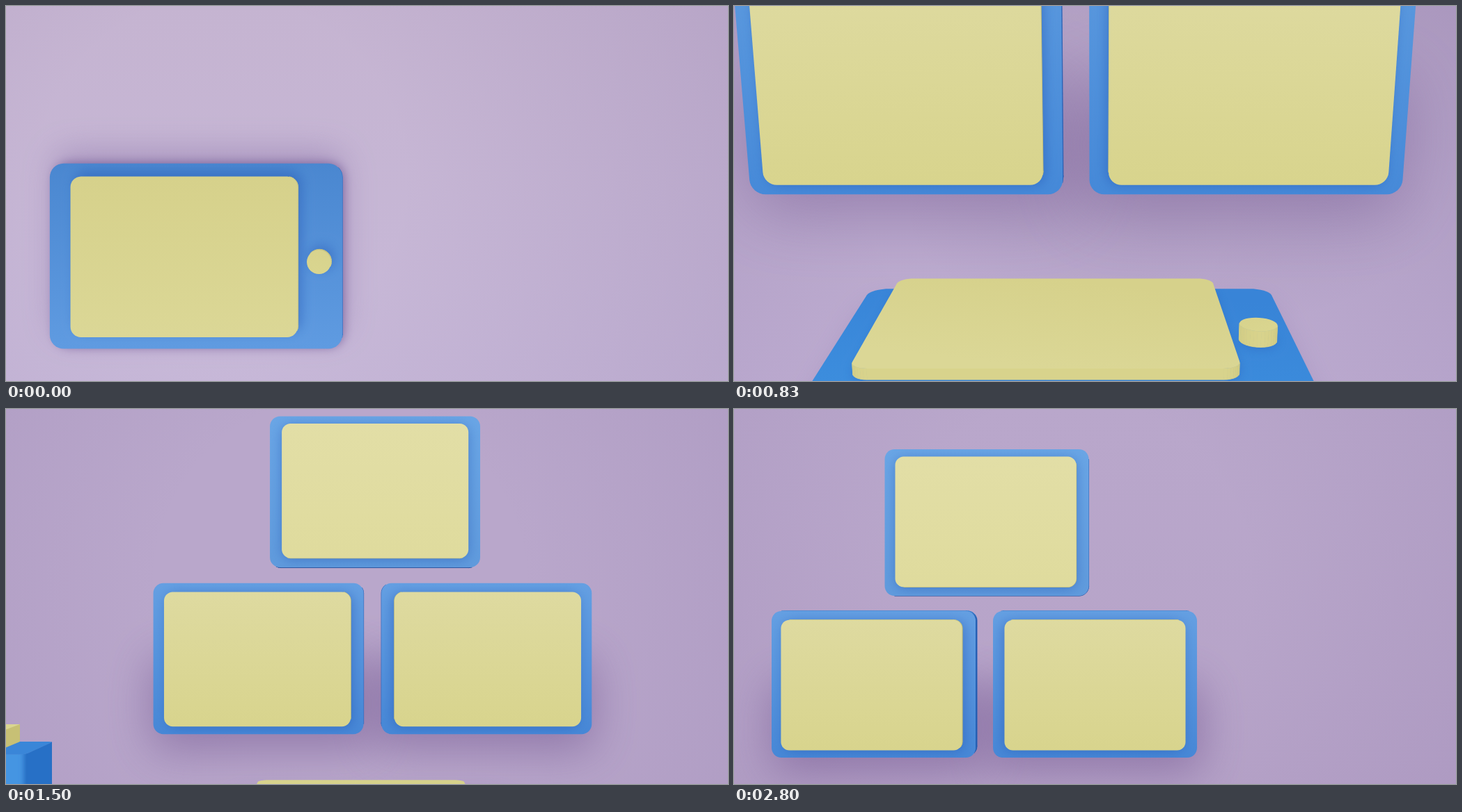
An HTML page with a canvas for the animation above (2970 ms loop, 1037 by 540 pixels).

```html
<!DOCTYPE html>
<html lang="en">
<head>
<meta charset="utf-8">
<title>Floating screens</title>
<style>
  html, body { margin: 0; width: 100%; height: 100%; overflow: hidden; background: #bba9cd; }
  canvas { display: block; width: 100%; height: 100%; }
</style>
</head>
<body>
<canvas id="stage" width="1037" height="540"></canvas>
<script>
const ctx = document.getElementById('stage').getContext('2d');
const W = 1037, H = 540, LOOP = 2970, FOCAL = 1480;

// Times at which the picture advances
const TICKS = [0, 300, 330, 430, 530, 630, 730, 830, 930, 1030, 1100, 1130, 1200, 1230, 1330,
  1400, 1500, 1600, 1700, 2100, 2200, 2300, 2400, 2500, 2600, 2700, 2800];

// Camera path: time, x, y, z, downward pitch in degrees
const PATH = [
  [0, 191.3, 802, 138, 90],
  [260, 191.3, 802, 138, 90],
  [430, 157.2, 629.3, 266.8, 76],
  [830, 14.2, -102.5, 938, 14.07],
  [1230, -17, -240, 1359, 0],
  [1500, -11.2, -146.2, 1436, 0],
  [1700, -10, -116, 1443, 0],
  [2050, -10, -116, 1443, 0],
  [2100, -2.4, -115.5, 1445, 0],
  [2600, 130.4, -107.3, 1468, 0],
  [2800, 155.5, -106.5, 1480, 0],
  [2970, 155.5, -106.5, 1480, 0]
];

// Backdrop: time, top colour, bottom colour
const SKY = [
  [0, '#c5b4d1', '#c7b8d8'],
  [300, '#c5b4d1', '#c7b8d8'],
  [430, '#b9a6ca', '#bfaed1'],
  [830, '#b2a0c4', '#bfaed2'],
  [1230, '#b8a6cb', '#c3b4d8'],
  [1500, '#b9a7cb', '#b9a7cb'],
  [2970, '#b9a7cb', '#b6a3c8']
];

const BLUE = { front: '#3c8cdc', rear: '#26559f', right: '#2f78cc', left: '#2f78cc' };
const BLUE_BOX = { ...BLUE, front: '#4595e2', right: '#2770c6' };
const BLUE_WALL = { front: '#26559f', rear: '#3f87d4', right: '#2560b4', left: '#2d6cc0' };
const YELLOW = { front: '#d8d38c', rear: '#c9c37c', right: '#d0ca82', left: '#d3cd85' };
const YELLOW_BOX = { ...YELLOW, right: '#c7c075' };
const YELLOW_WALL = { front: '#c2bb78', rear: '#cdc77d', right: '#c6bf74', left: '#c9c27a' };

const rgb = hex => [1, 3, 5].map(i => parseInt(hex.slice(i, i + 2), 16));
function mix(a, b, k) {
  const p = rgb(a), q = rgb(b);
  return '#' + p.map((v, i) => Math.round(v + (q[i] - v) * k).toString(16).padStart(2, '0')).join('');
}

function segment(keys, t) {
  let i = 0;
  while (i < keys.length - 2 && t >= keys[i + 1][0]) i++;
  return [i, (t - keys[i][0]) / (keys[i + 1][0] - keys[i][0])];
}

// Monotone cubic through the keys, so that the camera never overshoots
function smooth(keys, t, col) {
  const [i, u] = segment(keys, t);
  const slope = j => j < 0 || j > keys.length - 2 ? 0
    : (keys[j + 1][col] - keys[j][col]) / (keys[j + 1][0] - keys[j][0]);
  const tangent = j => {
    const a = slope(j - 1), b = slope(j);
    return a * b > 0 ? 2 * a * b / (a + b) : 0;
  };
  const span = keys[i + 1][0] - keys[i][0], v = 1 - u;
  return keys[i][col] * v * v * (1 + 2 * u) + keys[i + 1][col] * u * u * (3 - 2 * u)
    + span * u * v * (tangent(i) * v - tangent(i + 1) * u);
}

const cam = {};
function aim(t) {
  ['x', 'y', 'z'].forEach((name, i) => cam[name] = smooth(PATH, t, i + 1));
  const pitch = smooth(PATH, t, 4);
  cam.sin = Math.sin(pitch * Math.PI / 180);
  cam.cos = Math.cos(pitch * Math.PI / 180);
  cam.tilt = pitch / 90;
}

function project([x, y, z]) {
  const dy = y - cam.y, dz = z - cam.z;
  const scale = FOCAL / (-cam.sin * dy - cam.cos * dz);
  return [W / 2 + (x - cam.x) * scale, H / 2 - (cam.cos * dy - cam.sin * dz) * scale, scale];
}

// Rounded rectangle as a ring of points
function outline(w, h, r) {
  const points = [], steps = 8;
  for (let q = 0; q < 4; q++) {
    const sx = q === 0 || q === 3 ? 1 : -1, sy = q < 2 ? 1 : -1;
    for (let i = 0; i <= steps; i++) {
      const a = (q + i / steps) * Math.PI / 2;
      points.push([sx * (w / 2 - r) + r * Math.cos(a), sy * (h / 2 - r) + r * Math.sin(a)]);
    }
  }
  return points;
}

// Slabs either face the viewer or lie flat on the floor
const place = (s, u, v, d) => s.flat ? [s.x + u, s.y - d, s.z - v] : [s.x + u, s.y + v, s.z - d];
const rim = (s, d = 0) => outline(s.w, s.h, s.r).map(([u, v]) => project(place(s, u, v, d)));

function trace(points, dx = 0, dy = 0) {
  ctx.beginPath();
  points.forEach(p => ctx.lineTo(p[0] + dx, p[1] + dy));
  ctx.closePath();
}

function softShape(points, color, blur, dx = 0, dy = 0) {
  const away = 6000;
  ctx.save();
  ctx.shadowColor = color;
  ctx.shadowBlur = blur;
  ctx.shadowOffsetX = away;
  ctx.fillStyle = '#000';
  trace(points, dx - away, dy);
  ctx.fill();
  ctx.restore();
}

function drawSlab(s) {
  const edge = outline(s.w, s.h, s.r), top = rim(s), base = rim(s, s.t);
  edge.forEach(([u, v], i) => {
    const j = (i + 1) % edge.length;
    let nu = edge[j][1] - v, nv = u - edge[j][0];
    const len = Math.hypot(nu, nv);
    if (len < 1e-6) return;
    nu /= len; nv /= len;
    const p = place(s, u, v, 0);
    const facing = nu * (cam.x - p[0]) + nv * (s.flat ? p[2] - cam.z : cam.y - p[1]);
    if (facing <= 0) return;
    const color = mix(nv < 0 ? s.side.front : s.side.rear, nu > 0 ? s.side.right : s.side.left, nu * nu);
    ctx.fillStyle = ctx.strokeStyle = color;
    ctx.lineWidth = 0.8;
    trace([top[i], top[j], base[j], base[i]]);
    ctx.fill();
    ctx.stroke();
  });
  const a = project(place(s, 0, s.h / 2, 0)), b = project(place(s, 0, -s.h / 2, 0));
  const shade = ctx.createLinearGradient(a[0], a[1], b[0], b[1]);
  shade.addColorStop(0, s.cap[0]);
  shade.addColorStop(1, s.cap[1]);
  ctx.fillStyle = shade;
  trace(top);
  ctx.fill();
}

function castOn(ground, item, dx, dy) {
  ctx.save();
  trace(rim(ground));
  ctx.clip();
  softShape(rim(item, item.t), 'rgba(35,85,180,.5)', 17, dx, dy);
  ctx.restore();
}

function drawMonitor(x, y, blue, yellow, lean) {
  const k = cam.tilt;
  const body = { x, y, z: 0, w: 293, h: 211, r: 14, t: 18, side: BLUE_WALL,
    cap: [mix(blue[0], '#2c76cb', k), mix(blue[1], '#3f93e2', k)] };
  const face = { x, y, z: 14, w: 257.6, h: 186, r: 12, t: 5, side: YELLOW_WALL, cap: yellow };
  drawSlab(body);
  castOn(body, face, lean, 2);
  drawSlab(face);
}

function drawTablet() {
  const k = cam.tilt ** 2;
  const body = { flat: true, x: -7.5, y: -396, z: 211, w: 340, h: 216, r: 16, t: 10, side: BLUE,
    cap: [mix('#3884d7', '#4a87d0', k), mix('#3b8ddd', '#5f9be1', k)] };
  const face = { flat: true, x: -18.8, y: -381.5, z: 211, w: 261, h: 185, r: 12, t: 8, side: YELLOW,
    cap: ['#d6d18b', '#dbd796'] };
  const knob = { flat: true, x: 136, y: -384, z: 217, w: 28, h: 28, r: 14, t: 12.5, side: YELLOW,
    cap: ['#d8d38d', '#d9d58f'] };
  const under = { ...body, y: -417 };
  softShape(rim({ ...under, z: 203 }), 'rgba(110,82,148,.35)', 48, 0, -8 * k);
  softShape(rim(under), 'rgba(98,70,135,.75)', 16);
  drawSlab(body);
  castOn(body, face, 4 * k, -7 * k);
  castOn(body, knob, 3 * k, -5 * k);
  drawSlab(face);
  drawSlab(knob);
}

function drawSideBox() {
  const body = { flat: true, x: -542, y: -318, z: 268.5, w: 320, h: 99, r: 7, t: 84,
    side: BLUE_BOX, cap: ['#3a86d8', '#3a8ad8'] };
  const lid = { flat: true, x: -547, y: -296, z: 268.5, w: 260, h: 75, r: 2, t: 20,
    side: YELLOW_BOX, cap: ['#dad690', '#dad690'] };
  drawSlab(body);
  drawSlab(lid);
}

function drawBackdrop(t) {
  const [i, u] = segment(SKY, t);
  const sky = ctx.createLinearGradient(0, 0, 0, H);
  sky.addColorStop(0, mix(SKY[i][1], SKY[i + 1][1], u));
  sky.addColorStop(1, mix(SKY[i][2], SKY[i + 1][2], u));
  ctx.fillStyle = sky;
  ctx.fillRect(0, 0, W, H);

  const cx = 480 - 170 * cam.tilt;
  const vignette = ctx.createRadialGradient(cx, 250, 260, cx, 250, 760);
  vignette.addColorStop(0, 'rgba(110,85,145,0)');
  vignette.addColorStop(1, 'rgba(110,85,145,.15)');
  ctx.fillStyle = vignette;
  ctx.fillRect(0, 0, W, H);
}

function drawWallShadows() {
  const alpha = 0.46 * (1 - 0.7 * cam.tilt);
  for (const x of [-162.5, 155.5]) {
    const patch = rim({ x, y: -300, z: -40, w: 316, h: 134, r: 14 });
    softShape(patch, `rgba(100,70,132,${alpha})`, 64 * patch[0][2]);
  }
  const [x, y, scale] = project([100, -405, -170]);
  ctx.save();
  ctx.translate(x, y);
  ctx.scale(scale * 300, scale * 130);
  const pool = ctx.createRadialGradient(0, 0, 0, 0, 0, 1);
  pool.addColorStop(0, `rgba(92,70,118,${0.55 * cam.tilt})`);
  pool.addColorStop(0.5, `rgba(92,70,118,${0.36 * cam.tilt})`);
  pool.addColorStop(1, 'rgba(92,70,118,0)');
  ctx.fillStyle = pool;
  ctx.fillRect(-1, -1, 2, 2);
  ctx.restore();
}

function draw(t) {
  aim(t);
  drawBackdrop(t);
  if (t >= 300) {
    drawWallShadows();
    const low = ['#649fe2', '#4687d6'], lowFace = ['#dedaa0', '#d8d48d'];
    drawMonitor(-162.5, -233, low, lowFace, 3);
    drawMonitor(155.5, -233, low, lowFace, -3);
    drawMonitor(0, 0, ['#69a5e5', '#5f9adc'], ['#e2dea6', '#dfdb9d'], 0);
  }
  drawSideBox();
  drawTablet();
}

function frame(now) {
  const t = now % LOOP;
  draw(TICKS.filter(tick => tick <= t).pop() ?? 0);
  requestAnimationFrame(frame);
}
draw(0);
requestAnimationFrame(frame);
</script>
</body>
</html>
```
